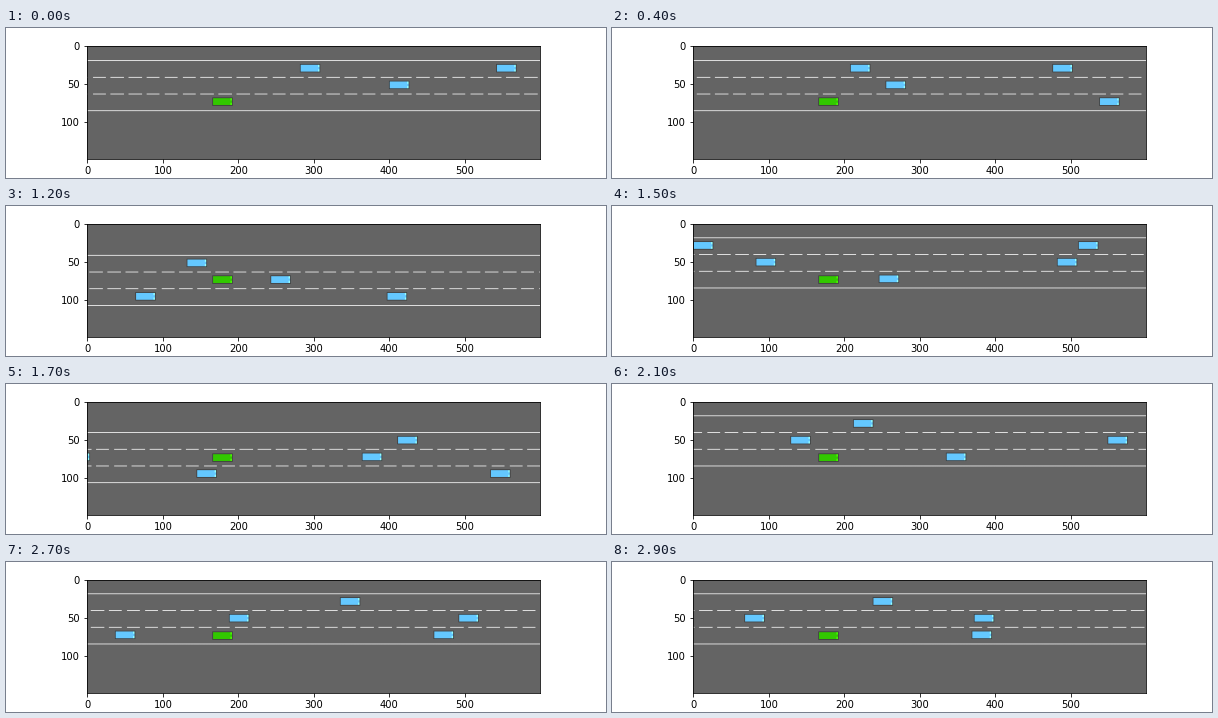
Recreate the animation shown at these times as a matplotlib script. Size 600 px wide and 150 px high, loop 3 s.

```python
import numpy as np
import matplotlib.pyplot as plt
from matplotlib.animation import FuncAnimation

W, H, DPI = 600, 150, 72
FRAMES, STEP = 30, 100
SCALE = 5.5                      # pixels per metre
LANE = 22
STRIPE, GAP = 3 * SCALE, 4.33 * SCALE
BOOST = 4.3                      # step at which the ego goes from 25 to 30 m/s
EGO_X, EGO_Y = 180, 75
SAFE_GAP = 90                    # the ego swaps lanes below this distance

GREY, WHITE, DARK = (100, 100, 100), (255, 255, 255), (60, 60, 60)
BLUE, GREEN = (100, 200, 255), (50, 200, 0)

# per lane: step at which the ego draws level with a car, and closing speed
TRAFFIC = [
    [(5.09, 46.1), (11.23, 44), (21.93, 49.6), (30.48, 48.6)],
    [(5.52, 63.8), (13.45, 53.3), (20.37, 58.8), (27.37, 60.2), (32.43, 60)],
    [(10.31, 60.2), (16.58, 50.5), (24.4, 49.7), (33.49, 45.2)],
]


def car_x(n, meet, speed):
    """Place of a car in the picture; it nears slower before the boost."""
    return round(EGO_X + speed * (meet - n) - 5 * SCALE * max(0, BOOST - n))


def ego_lane(n):
    """Replay the drive: swap bottom and middle lane when a car is close."""
    lane = 2
    for step in range(n):
        gaps = [car_x(step, *car) - EGO_X for car in TRAFFIC[lane]]
        if any(0 < gap < SAFE_GAP for gap in gaps):
            lane = 3 - lane
    return lane


def fill(img, x, y, w, h, color):
    img[max(y, 0):max(y + h, 0), max(x, 0):max(x + w, 0)] = color


def draw_car(img, x, y, color):
    left, top = x - 14, y - 6
    light = [min(int(c / 0.68), 255) for c in color]
    fill(img, left, top, 27, 11, DARK)
    fill(img, left + 1, top + 1, 25, 9, color)
    for dy in (1, 7):
        fill(img, left + 24, top + dy, 2, 3, light)


def draw_road(img, top, n):
    for edge in (top, top + 3 * LANE):
        fill(img, 0, edge, W, 1, WHITE)
    travelled = 25 * n + 5 * max(0, n - BOOST)
    start = (8 - SCALE * travelled) % GAP - GAP
    for x in np.arange(start, W, GAP):
        x0, x1 = int(np.floor(x)), int(np.floor(x + STRIPE))
        for line in (1, 2):
            fill(img, x0, top + line * LANE, x1 - x0 + 1, 1, WHITE)


def render(n):
    img = np.full((H, W, 3), GREY, dtype=np.uint8)
    # the camera stays level with the ego, with a slight drift
    top = round(20 - 0.04 * n) + (2 - ego_lane(n)) * LANE
    draw_road(img, top, n)
    for lane, cars in enumerate(TRAFFIC):
        for car in cars:
            draw_car(img, car_x(n, *car), top + LANE // 2 + lane * LANE, BLUE)
    draw_car(img, EGO_X, EGO_Y, GREEN)
    return img


plt.rcParams.update({"font.family": "DejaVu Sans", "font.size": 10})
fig, ax = plt.subplots(figsize=(W / DPI, H / DPI), dpi=DPI)
fig.subplots_adjust(left=0.125, right=0.9, bottom=0.125, top=0.88)
picture = ax.imshow(render(0))
ax.set_xticks(range(0, W, 100))
ax.set_yticks(range(0, H, 50))


def update(n):
    picture.set_data(render(n))
    return [picture]


anim = FuncAnimation(fig, update, frames=FRAMES, interval=STEP,
                     repeat=True, repeat_delay=0)
plt.show()
```
